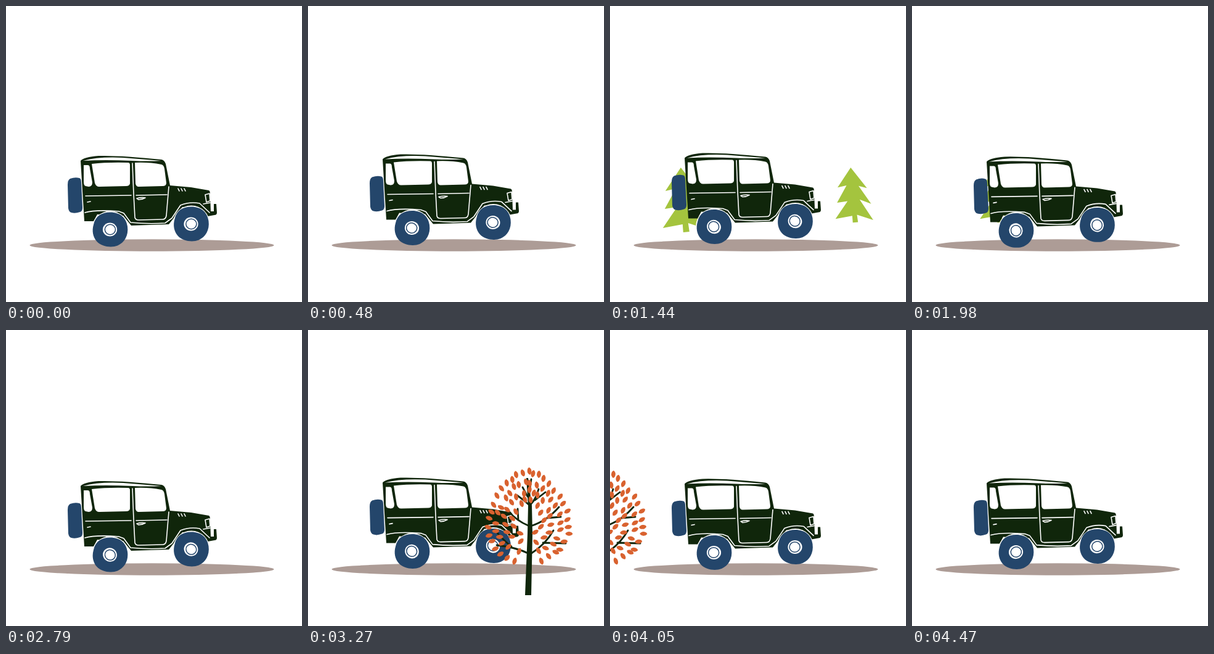
An HTML page that plays this animation: 480 by 480 pixels, repeating every 4.5 s.

```html
<!DOCTYPE html>
<html>
<head>
<meta charset="utf-8">
<style>
  html, body { margin: 0; width: 100%; height: 100%; overflow: hidden; background: #fff; }
  svg { display: block; width: 100vw; height: 100vh; }
  .dark { fill: #10260b; }
  .navy { fill: #24466b; }
  .white { fill: #fff; }
  .line { fill: none; stroke: #fff; stroke-width: 1.6; stroke-linecap: round; stroke-linejoin: round; }
  .twig { fill: none; stroke: #10260b; stroke-width: 2.8; stroke-linecap: round; }
</style>
</head>
<body>
<svg viewBox="0 0 480 480">
  <defs>
    <path id="pine" fill="#a4c43e" d="M-6 0L25 39 9 35 33 69 11 61 37 100 6 90 8 104-2 105-3 92-35 98-12 64-32 67-14 34-31 38Z"/>
    <g id="wheel">
      <path class="white" d="M-30 0A30 30 0 0 1 30 0Z"/>
      <path class="navy" d="M-27-8C-24-22-14-28 0-28 16-28 26-19 28-5 30 10 23 21 12 26 2 30-14 28-22 19-28 12-30 2-27-8Z"/>
      <g id="hub">
        <ellipse class="white" rx="11.6" ry="11"/>
        <ellipse cx=".4" rx="8.6" ry="8.2" fill="none" stroke="#24466b" stroke-width="1.5"/>
      </g>
    </g>
  </defs>

  <ellipse cx="236.5" cy="388" rx="198" ry="9.7" fill="#ad9c96"/>
  <use id="pine1" href="#pine"/>
  <use id="pine2" href="#pine"/>

  <g id="car">
    <path class="navy" d="M104 280Q112 277 119 279 122 280 122 286L124 327Q124 333 120 334 112 337 106 335 102 334 101 328L100 290Q100 282 104 280Z"/>
    <path class="dark" d="M121 251Q126 245 150 243 185 242 252 249 257 250 259 256L266 291 300 294 329 299Q331 300 331 305L332 333 337 333 337 321 341 321 342 335Q342 339 338 339L327 341 312 326 286 326 264 354 203 356 190 340 148 338 142 349 127 349Z"/>
    <path class="white" d="M125 251Q150 244 190 246L252 251Q230 252 205 251 160 249 125 251Z"/>
    <path class="white" d="M126 258L133 258Q136 258 136 264L140 286Q140 293 134 293L129 292Q126 291 126 285Z"/>
    <path class="white" d="M139 256Q165 253 198 254 201 254 201 258L201 288Q200 292 195 292L151 293Q146 293 144 287Z"/>
    <path class="white" d="M209 254Q232 253 252 257 256 258 257 264L260 287Q260 292 254 292L215 293Q211 293 210 288Z"/>
    <path class="line" d="M205 255L207 305 209 343Q210 347 215 347L254 346Q259 346 260 340L264 293M129 308L203 307M211 307L261 306M132 318L137 317"/>
    <path class="line" d="M212 312Q219 310 226 311 221 314 215 314Z"/>
    <path class="line" d="M128 335Q145 330 183 333L191 336 202 351Q230 354 258 352L269 344 283 323Q298 317 314 320L330 335"/>
    <path class="line" d="M279 296L281 300M284 296L286 300M289 296L291 300M323 306L330 304 331 316 325 318ZM320 321L331 319"/>
    <use href="#wheel" x="169" y="362.5"/>
    <use href="#wheel" x="300.5" y="353.5"/>
  </g>

  <g id="maple">
    <path class="dark" d="M-3 240L0 240 6 285 7 330 5 430-5 430-1 330 0 285Z"/>
    <path class="twig" d="M2 284Q-8 275-18 268M-1 270L-9 255M4 283Q12 275 17 258M11 276L28 263M2 264L5 242M2 318Q-20 309-31 294M-16 308L-17 290M4 318Q30 310 50 287M30 305L53 303M2 363Q-20 352-51 349M-27 351Q-44 338-53 325M4 363Q28 348 41 325M24 345L61 346"/>
    <g id="leaves" fill="#d9622f"></g>
  </g>
</svg>
<script>
const LOOP = 4500, STEP = 30, SPEED = 0.473;
const $ = id => document.getElementById(id);

let seed = 7;
const jitter = size => {
  seed = seed * 16807 % 2147483647;
  return (seed / 2147483647 - .5) * size;
};

// Leaves sit on nested egg-shaped rings, open at the trunk, and point outwards
let leaves = '';
for (let ring = 1; ring > .3; ring -= .21) {
  const count = Math.round(33 * ring);
  for (let i = 0; i < count; i++) {
    const a = Math.PI * (1.9 * (i + .5) / count - .95);
    const x = 64 * ring * Math.sin(a) * (1 - .25 * Math.cos(a)) + jitter(5);
    const y = 303 - 72 * ring * Math.cos(a) + jitter(5);
    const angle = Math.atan2(y - 335, x) * 180 / Math.PI + jitter(30);
    leaves += `<path d="M-6 0Q-3-4 1-3.3 5-3 6 0 3 4-1 3.3-5 3-6 0Z"
      transform="translate(${x} ${y}) rotate(${angle})"/>`;
  }
}
$('leaves').innerHTML = leaves;

// Bumpy ride: eased between [time, offset] points
const bumps = [
  [0, 0], [270, -4.5], [930, 4.4], [1400, -4.5], [1980, 1.4], [2350, -3.5],
  [2790, 2], [3270, -3.4], [3720, -1], [4470, -2.4], [LOOP, 0]
];
function bounce(t) {
  const i = bumps.findIndex(b => b[0] > t);
  const [[t0, y0], [t1, y1]] = [bumps[i - 1], bumps[i]];
  return y0 + (y1 - y0) * (1 - Math.cos(Math.PI * (t - t0) / (t1 - t0))) / 2;
}

function place(id, x, y, extra = '') {
  $(id).setAttribute('transform', `translate(${x} ${y}) ${extra}`);
}

function draw() {
  const t = Math.floor(performance.now() % LOOP / STEP) * STEP;
  const scroll = (x, at) => x - SPEED * (t - at);
  place('car', 0, bounce(t));
  place('hub', -.5, 0, `rotate(${t * .4})`);
  place('pine1', scroll(362, 930), 262);
  place('pine2', scroll(140, 1980), 262, 'scale(.85)');
  place('maple', scroll(357, 3270), 0);
  requestAnimationFrame(draw);
}
draw();
</script>
</body>
</html>
```
